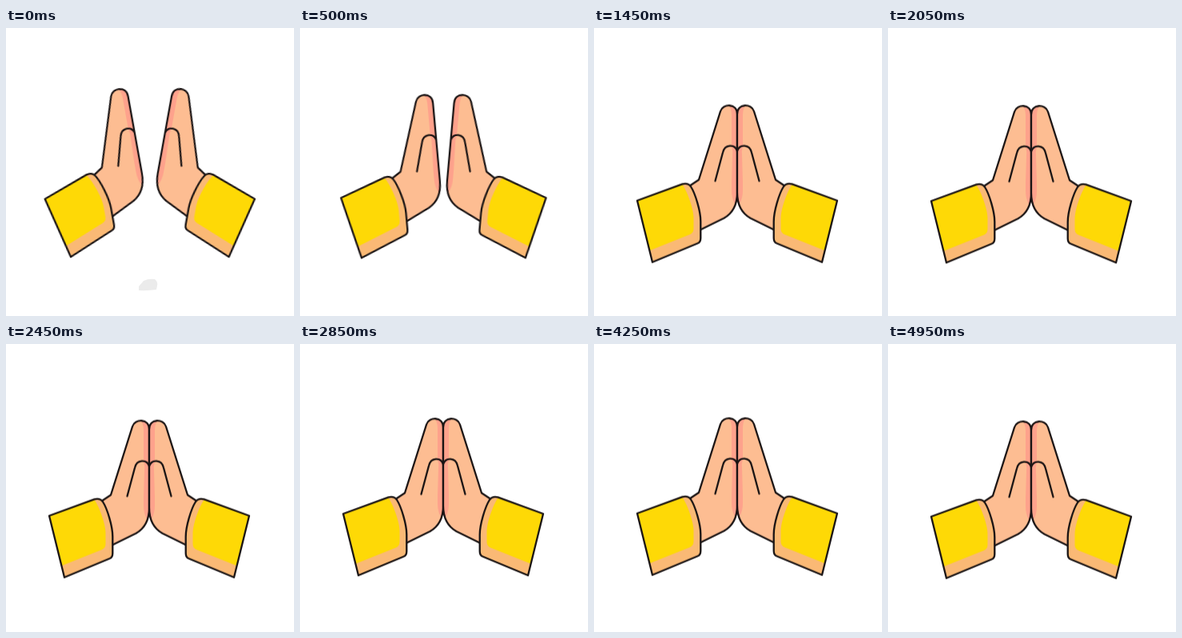
Animation, 360 px wide and 360 px high, one loop 5 s. Source, as an HTML page:

```html
<!DOCTYPE html>
<html lang="en">
<head>
<meta charset="utf-8">
<title>Folded hands</title>
<style>
  html, body { margin: 0; width: 100%; height: 100%; overflow: hidden; background: #fff; }
  svg { display: block; width: 100%; height: 100%; }
  .line { fill: none; stroke: #1a1414; stroke-width: 2.3; stroke-linecap: round; stroke-linejoin: round; }
  .skin { fill: #fdbd92; }
  .blush { fill: #fea28c; }
  .cuff { fill: #fab975; }
  .sleeve { fill: #fed906; }
  .bob { animation: bob 5s infinite; }
  .turn { transform-box: view-box; transform-origin: 75px 245px; animation: turn 5s infinite; }
  .right { transform-origin: 74px 254px; }
  .spot { fill: #ebebeb; animation: spot 5s step-end infinite; }

  /* slow sine drift, cut off by the loop before its last crest */
  @keyframes bob {
    0%, 2% { transform: translateY(-3.5px); animation-timing-function: cubic-bezier(.364, 0, .636, 1); }
    37% { transform: translateY(3.5px); animation-timing-function: cubic-bezier(.364, 0, .636, 1); }
    72% { transform: translateY(-3.5px); animation-timing-function: cubic-bezier(.35, 0, .7, .755); }
    100% { transform: translateY(2.83px); }
  }
  @keyframes turn {
    0% { transform: rotate(-10.2deg); animation-timing-function: cubic-bezier(.333, 0, .667, 1); }
    20%, 100% { transform: rotate(0deg); }
  }
  @keyframes spot {
    0% { visibility: visible; }
    1%, 100% { visibility: hidden; }
  }
</style>
</head>
<body>
<svg viewBox="0 0 360 360">
  <defs>
    <path id="palm" d="M119 195 L131 187 L158 101.500 C161 91.500 179 91 179 105 V203 C179 218 173 229 162.500 235 L132 250 Z"/>
    <path id="wrap" d="M54 213 L110.500 192.300 Q117.500 190.500 121 195.500 C126.500 204 133.300 226 133.300 239 V260 Q133.300 265 129.500 266.500 L73 290 Z"/>
    <g id="arm">
      <use href="#palm" class="skin"/>
      <path class="blush" d="M169 94.500 Q179 95 179 105 V203 Q179 211 176 217 Q172 210 172 200 V106 Q172 99 169 94.500 Z"/>
      <path class="skin" d="M162 152 Q165 145 170 145 Q174 146 173 156 L172 190 H155 Z"/>
      <use href="#palm" class="line"/>
      <path class="line" d="M151.500 188.500 L161 153 C163.500 142.500 176 142 179 151"/>
      <use href="#wrap" class="cuff"/>
      <path class="sleeve" d="M54 213 L110 192.500 C117 202 124.500 224 124.500 235 V248 Q124.500 253.500 119.500 255.500 L69.500 275.500 Z"/>
      <use href="#wrap" class="line"/>
    </g>
  </defs>
  <path class="spot" d="M166 328 V323 L172 316 Q178 313 186 314 Q190 317 189 322 L188 327 Q178 328.500 166 328 Z"/>
  <g class="bob">
    <use href="#arm" class="turn"/>
    <g transform="matrix(-1 0 0 1 358 0)"><use href="#arm" class="turn right"/></g>
  </g>
</svg>
</body>
</html>
```
